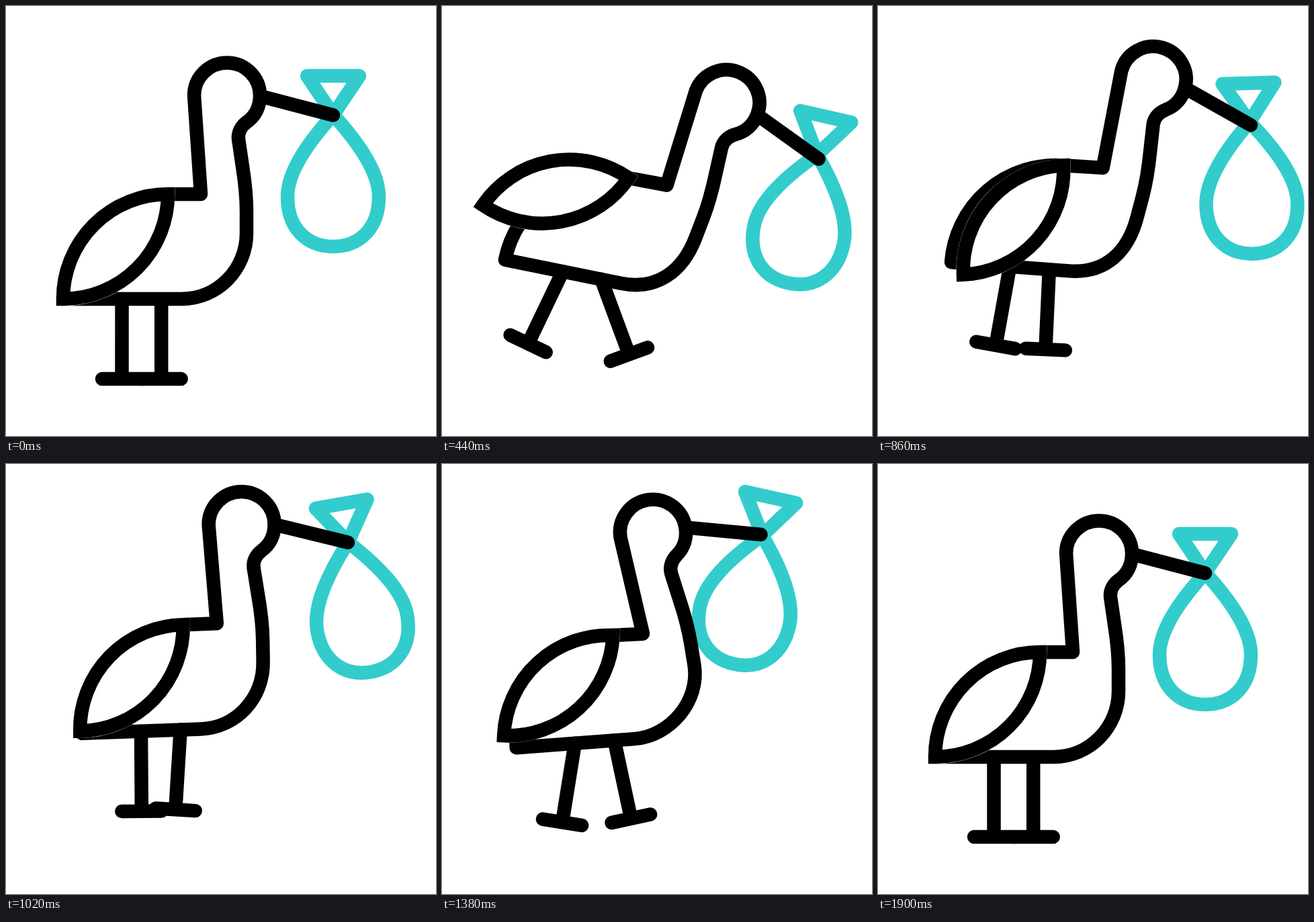
An HTML page with a canvas for the animation above (2.4 s loop, 640 px wide and 640 px high).

```html
<!DOCTYPE html>
<html lang="en">
<head>
<meta charset="utf-8">
<title>Stork</title>
<style>
html, body { margin: 0; width: 100%; height: 100%; overflow: hidden; background: #fff; }
canvas { display: block; width: 640px; height: 640px; }
</style>
</head>
<body>
<canvas id="stage" width="640" height="640"></canvas>
<script>
const ctx = document.getElementById('stage').getContext('2d');
const LOOP = 2400, END = 1900, WIDTH = 20.5, BLACK = '#000', TEAL = '#33cccc';

// Eases from 0 through the extremes [time, value] and back to 0 at end
function swing(t, end, ...extremes) {
  let t0 = 0, v0 = 0;
  for (const [t1, v1] of [...extremes, [end, 0]]) {
    if (t < t1) {
      const u = (t - t0) / (t1 - t0);
      return v0 + (v1 - v0) * u * u * (3 - 2 * u);
    }
    [t0, v0] = [t1, v1];
  }
  return 0;
}

// Matrix that turns by deg and carries the rest point (px, py) to (x, y)
function place(px, py, [x, y], deg) {
  return new DOMMatrix().translate(x, y).rotate(deg).translate(-px, -py);
}

function at(m, x, y) {
  const p = m.transformPoint({ x, y });
  return [p.x, p.y];
}

function stroke(color, width = WIDTH) {
  ctx.resetTransform();
  ctx.strokeStyle = color;
  ctx.lineWidth = width;
  ctx.stroke();
}

function drawSack(m) {
  ctx.setTransform(m);
  ctx.beginPath();
  ctx.moveTo(487, 162);
  ctx.lineTo(448, 104);
  ctx.lineTo(526, 104);
  ctx.lineTo(487, 162);
  ctx.bezierCurveTo(447, 206, 419, 248, 419, 284);
  ctx.bezierCurveTo(419, 330, 447, 358, 487, 358);
  ctx.bezierCurveTo(527, 358, 555, 330, 555, 284);
  ctx.bezierCurveTo(555, 248, 527, 206, 487, 162);
  ctx.closePath();
  stroke(TEAL);
}

function drawLeg(hip, deg) {
  ctx.setTransform(place(0, 0, hip, deg));
  ctx.beginPath();
  ctx.moveTo(0, 0);
  ctx.lineTo(0, 119);
  ctx.moveTo(-29.5, 119);
  ctx.lineTo(29.5, 119);
  stroke(BLACK);
}

// One outline whose points follow either the body or the neck
function drawBody(body, neck) {
  ctx.beginPath();
  ctx.setTransform(body);
  ctx.arc(241, 436, 156, Math.PI, 1.5 * Math.PI);
  ctx.setTransform(neck);
  ctx.lineTo(290, 280);
  ctx.lineTo(280, 133);
  ctx.arc(329, 133.5, 49, Math.PI, 2 * Math.PI);
  ctx.bezierCurveTo(378, 150, 371, 164, 358, 173);
  ctx.bezierCurveTo(350, 179, 345, 188, 346, 198);
  ctx.lineTo(352, 239);
  ctx.bezierCurveTo(356, 264, 358, 280, 358, 306);
  ctx.lineTo(358, 338);
  ctx.resetTransform();
  ctx.bezierCurveTo(...at(neck, 358, 392), ...at(body, 315, 436), ...at(body, 261, 436));
  ctx.closePath();
  stroke(BLACK);

  ctx.setTransform(neck);
  ctx.beginPath();
  ctx.moveTo(378, 134);
  ctx.lineTo(487, 162.5);
  stroke(BLACK);
}

function drawWing(m) {
  ctx.setTransform(m);
  ctx.beginPath();
  ctx.arc(241, 436, 156, Math.PI, 1.5 * Math.PI);
  ctx.arc(85, 280, 156, 0, 0.5 * Math.PI);
  ctx.closePath();
  ctx.fillStyle = '#fff';
  ctx.fill();
  ctx.lineJoin = 'miter';
  stroke('#fff', WIDTH + 0.3);
  stroke(BLACK);
  ctx.lineJoin = 'round';
}

function draw(now) {
  const t = now % LOOP;
  const x = 85 + swing(t, 1700, [1260, 31.5]);
  const y = 436 + swing(t, 1600, [620, -73], [1200, -24]);
  const tilt = swing(t, 1800, [550, 12.8], [1200, -5.5]);
  const lean = swing(t, 1800, [640, 27.3], [1220, -11.4]);
  const flap = swing(t, END, [560, 39], [900, -4], [1240, 6.7], [1560, -3.7]);
  const leftStep = swing(t, END, [560, 29], [1080, -1.5], [1560, 14]);
  const rightStep = swing(t, END, [470, -20.5], [940, 4.5], [1580, -17]);
  const sway = swing(t, END, [580, 15], [1040, -10], [1420, 13]);

  const body = place(85, 436, [x, y], tilt);
  const chest = at(body, 299, 332);
  const neck = place(299, 332, chest, lean);
  // The sack trails slightly behind the beak
  const knot = at(place(299, 332, chest, lean * 0.93), 487, 162);

  ctx.resetTransform();
  ctx.clearRect(0, 0, 640, 640);
  ctx.lineCap = ctx.lineJoin = 'round';
  drawSack(place(487, 162, knot, sway));
  drawLeg(at(body, 172.5, 436), leftStep);
  drawLeg(at(body, 231.2, 436), rightStep);
  drawBody(body, neck);
  drawWing(place(241, 280, at(body, 241, 280), flap));
}

const start = performance.now();
function tick() {
  draw(performance.now() - start);
  requestAnimationFrame(tick);
}
tick();
</script>
</body>
</html>
```
